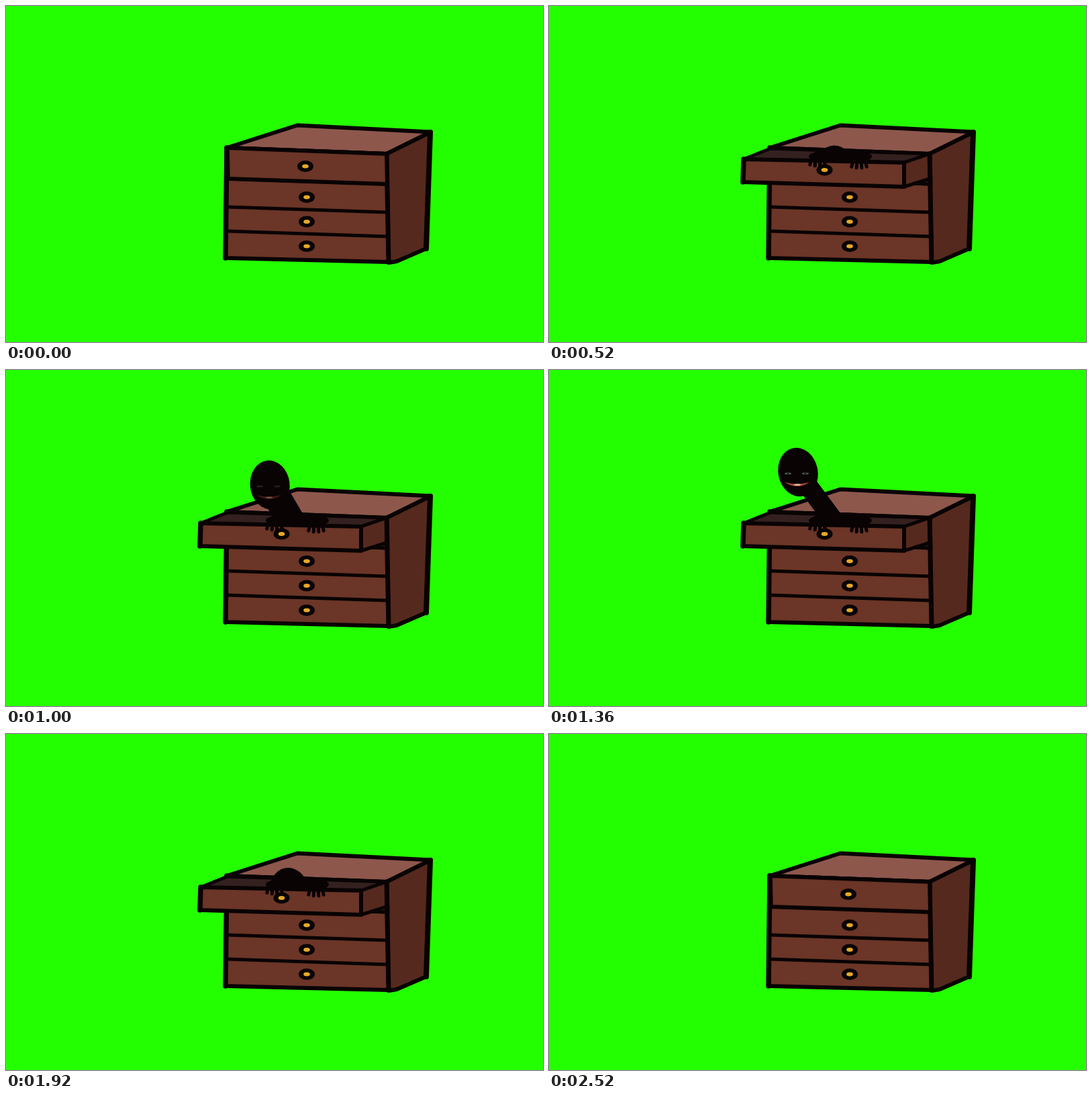
Recreate the animation shown at these times as an HTML page with a canvas. Size 800 px wide and 500 px high, loop 2.6 s.

```html
<!DOCTYPE html>
<html lang="en">
<head>
<meta charset="utf-8">
<title>Drawer</title>
<style>
html, body { margin: 0; width: 100%; height: 100%; overflow: hidden; background: #24ff00; }
canvas { display: block; }
</style>
</head>
<body>
<canvas id="stage" width="800" height="500"></canvas>
<script>
const ctx = document.getElementById('stage').getContext('2d');
const LOOP = 2600;
const INK = '#090304', FRONT = '#6b3527', TOP = '#8d574c', SIDE = '#56291e', DARK = '#33201f', GOLD = '#e5a923';

const HIDDEN = { x: 426, y: 256 }, PEEK = { x: 421, y: 195 };
const LEAN = { x: 371, y: 152 }, BACK = { x: 413, y: 176 };

const mix = (a, b, k) => a + (b - a) * k;
const clamp = v => Math.min(1, Math.max(0, v));
const between = (a, b, k) => ({ x: mix(a.x, b.x, k), y: mix(a.y, b.y, k) });

// Eased progress from 0 to 1 between two times.
function ease(t, from, to) {
  const u = clamp((t - from) / (to - from));
  return u * u * (3 - 2 * u);
}

function headAt(t) {
  if (t < 720) return between(HIDDEN, PEEK, ease(t, 440, 720));
  if (t < 1440) return between(PEEK, LEAN, ease(t, 720, 1240));
  if (t < 1680) return between(LEAN, BACK, ease(t, 1440, 1680));
  return between(BACK, HIDDEN, ease(t, 1680, 2040));
}

function trace(points, close) {
  ctx.beginPath();
  points.forEach(([x, y]) => ctx.lineTo(x, y));
  if (close) ctx.closePath();
}

function stroke(width) {
  ctx.strokeStyle = INK;
  ctx.lineWidth = width;
  ctx.stroke();
}

function shape(points, fill, width) {
  trace(points, true);
  ctx.fillStyle = fill;
  ctx.fill();
  stroke(width);
}

function line(points, width) {
  trace(points, false);
  stroke(width);
}

function oval(x, y, rx, ry, fill, tilt = 0) {
  ctx.beginPath();
  ctx.ellipse(x, y, rx, ry, tilt, 0, Math.PI * 2);
  ctx.fillStyle = fill;
  ctx.fill();
}

function knob(x, y) {
  oval(x, y, 12, 8.5, INK);
  oval(x, y, 4.8, 3, GOLD);
}

function cabinet() {
  shape([[329, 211], [434, 177.5], [633, 187.5], [567, 220]], TOP, 6);
  shape([[567, 220], [632, 188], [626, 361], [582, 380], [570, 382]], SIDE, 6);
  shape([[329, 211], [567, 220], [570, 381], [327, 375]], FRONT, 6);
  line([[329, 211], [327, 375]], 7.5);
  line([[632, 188], [626, 361]], 8);
  line([[567, 220], [570, 381]], 7);
  for (const [edge, knobY] of [[257, 284.5], [299, 321], [335, 357.5]]) {
    line([[330, edge], [568, edge + 8]], 5);
    knob(448, knobY);
  }
}

function face({ x, y }) {
  ctx.save();
  ctx.globalAlpha = clamp((400 - x) / 20);
  ctx.translate(x, y);
  for (const eye of [-15, 11]) {
    oval(eye, 2, 5, 1.6, '#505958');
    oval(eye, 2.2, 1.4, 1.4, '#182025');
  }
  ctx.beginPath();
  ctx.moveTo(-20, 15);
  ctx.quadraticCurveTo(-2, 20, 17, 15);
  ctx.quadraticCurveTo(-1, 27, -20, 15);
  ctx.fillStyle = '#a84a38';
  ctx.fill();
  oval(-1, 18.8, 5, 1.2, '#d8b8a4');
  ctx.restore();
}

function creature(t, hands) {
  const head = headAt(t);
  const lean = ease(t, 720, 1240);
  const root = { x: 425, y: 225 };
  const nape = between(head, root, 0.25);
  ctx.save();
  ctx.beginPath();
  ctx.rect(0, 0, 800, 240);
  ctx.clip();
  oval(435, 224 + (1 - hands) * 10, 46, 12, INK);
  if (head.y < 225) line([[nape.x, nape.y], [root.x, root.y]], mix(56, 29, lean));
  oval(head.x, head.y, 29.5, 36.5, INK, -0.2 * lean);
  face(head);
  ctx.restore();
}

function hand(x, y, reach) {
  oval(x, y - 3, 13, mix(3, 6, reach), INK);
  for (let i = -1.5; i <= 1.5; i++) {
    const tip = y + 11 - 0.8 * i * i;
    line([[x + i * 6, y], [x + i * 7.5, mix(y, tip, reach)]], 5);
  }
}

function drawer(t) {
  const open = ease(t, 40, 240) - ease(t, 2240, 2440);
  const hands = ease(t, 160, 400) - ease(t, 2160, 2300);
  const at = (a, b) => [mix(a[0], b[0], open), mix(a[1], b[1], open)];
  const tl = at([329, 211], [290, 228]), tr = at([567, 220], [529, 233]);
  const br = at([568, 265], [529, 269]), bl = at([330, 257], [289, 262]);

  if (open > 0) {
    shape([[330, 212], [567, 220], [568, 265], [330, 257]], DARK, 5);
    shape([tl, [330, 212], [567, 220], tr], DARK, 5);
    if (hands > 0) creature(t, hands);
    shape([tr, [567, 220], [567, mix(265, 257, open)], br], SIDE, 5);
    line([[567, 220], [568, 266]], 7);
  }
  shape([tl, tr, br, bl], FRONT, 6);
  line([tl, bl], 7.5);
  knob(...at([446, 238.5], [410.5, 244]));
  if (hands > 0) {
    hand(400, 227, hands);
    hand(462, 230, hands);
  }
}

function draw(t) {
  ctx.fillStyle = '#24ff00';
  ctx.fillRect(0, 0, 800, 500);
  ctx.lineJoin = ctx.lineCap = 'round';
  cabinet();
  drawer(t);
}

// Poses are held alternately for 40 and 80 ms.
function hold(t) {
  const phase = t % 120;
  return t >= 2520 ? 2520 : t - phase + (phase < 40 ? 0 : 40);
}

function tick(now) {
  draw(hold(now % LOOP));
  requestAnimationFrame(tick);
}
draw(0);
requestAnimationFrame(tick);
</script>
</body>
</html>
```
